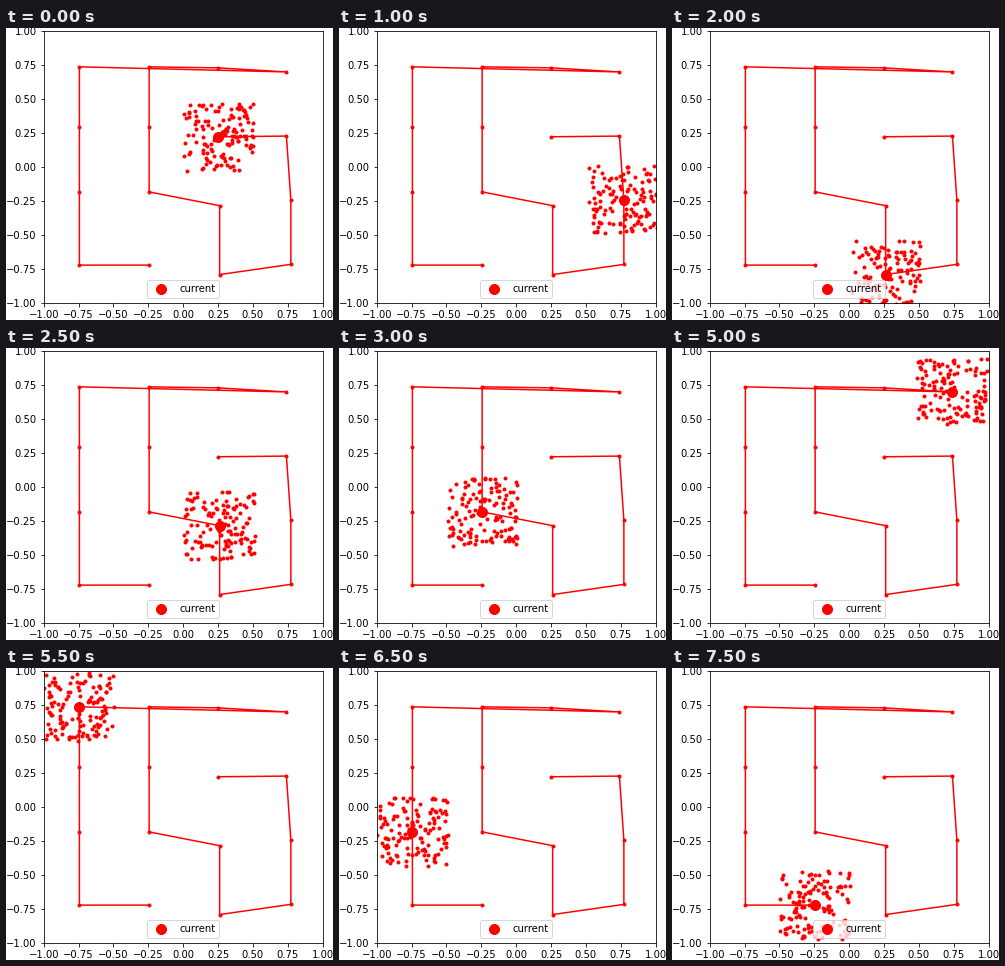
Recreate the animation shown at these times as a matplotlib script. Size 327 by 292 pixels, loop 8 s.

```python
import numpy as np
import matplotlib.pyplot as plt
from matplotlib.animation import FuncAnimation

WIDTH, HEIGHT, DPI = 327, 292, 72
STEP_MS = 500
SAMPLES = 130
SPREAD = 0.253
CELL = 0.5
MOVES = {"L": (-1, 0), "R": (1, 0), "U": (0, 1), "D": (0, -1)}
WALK = "R D D L U L U U R R LLL D D D R"


def walk_cells(start, walk):
    """Cell centres visited on a square grid, one per word of the walk."""
    cells = [np.array(start)]
    for word in walk.split():
        cells.append(cells[-1] + CELL * np.sum([MOVES[c] for c in word], axis=0))
    return np.array(cells)


def warp(cells):
    """Bend the regular grid slightly, differently on its left and right half."""
    x, y = cells.T
    left = 0.07 * np.cos(1.9 * y + 0.3)
    right = 0.045 * x - 0.04 - 0.14 * (x - 0.35) * y
    dx = 0.006 - 0.03 * np.maximum(x, 0) * np.sin(np.pi * y)
    return np.column_stack([x + dx, y + np.where(x < 0, left, right)])


nodes = warp(walk_cells((0.25, 0.25), WALK))

plt.rcParams["font.family"] = "DejaVu Sans"
plt.rcParams["font.size"] = 10

# The tiny excess keeps rounding from dropping a pixel
fig = plt.figure(figsize=((WIDTH + 0.001) / DPI, (HEIGHT + 0.001) / DPI),
                 dpi=DPI, facecolor="white")
ax = fig.add_axes([37.68 / WIDTH, 16.8 / HEIGHT, 279 / WIDTH, 271.8 / HEIGHT])
ticks = np.linspace(-1, 1, 9)
ax.set(xlim=(-1, 1), ylim=(-1, 1), xticks=ticks, yticks=ticks)

ax.plot(*nodes.T, "r.-", lw=1.5, ms=6)
cloud, = ax.plot([], [], "r.", ms=6)
current, = ax.plot([], [], "ro", ms=10, label="current")
ax.legend(loc="lower center")


def draw(step):
    node = nodes[step]
    rng = np.random.default_rng(100 + step)
    points = node + rng.uniform(-SPREAD, SPREAD, (SAMPLES, 2))
    cloud.set_data(*points.T)
    current.set_data([node[0]], [node[1]])
    return cloud, current


anim = FuncAnimation(fig, draw, frames=len(nodes), interval=STEP_MS,
                     repeat=True, repeat_delay=0, blit=False)
plt.show()
```
